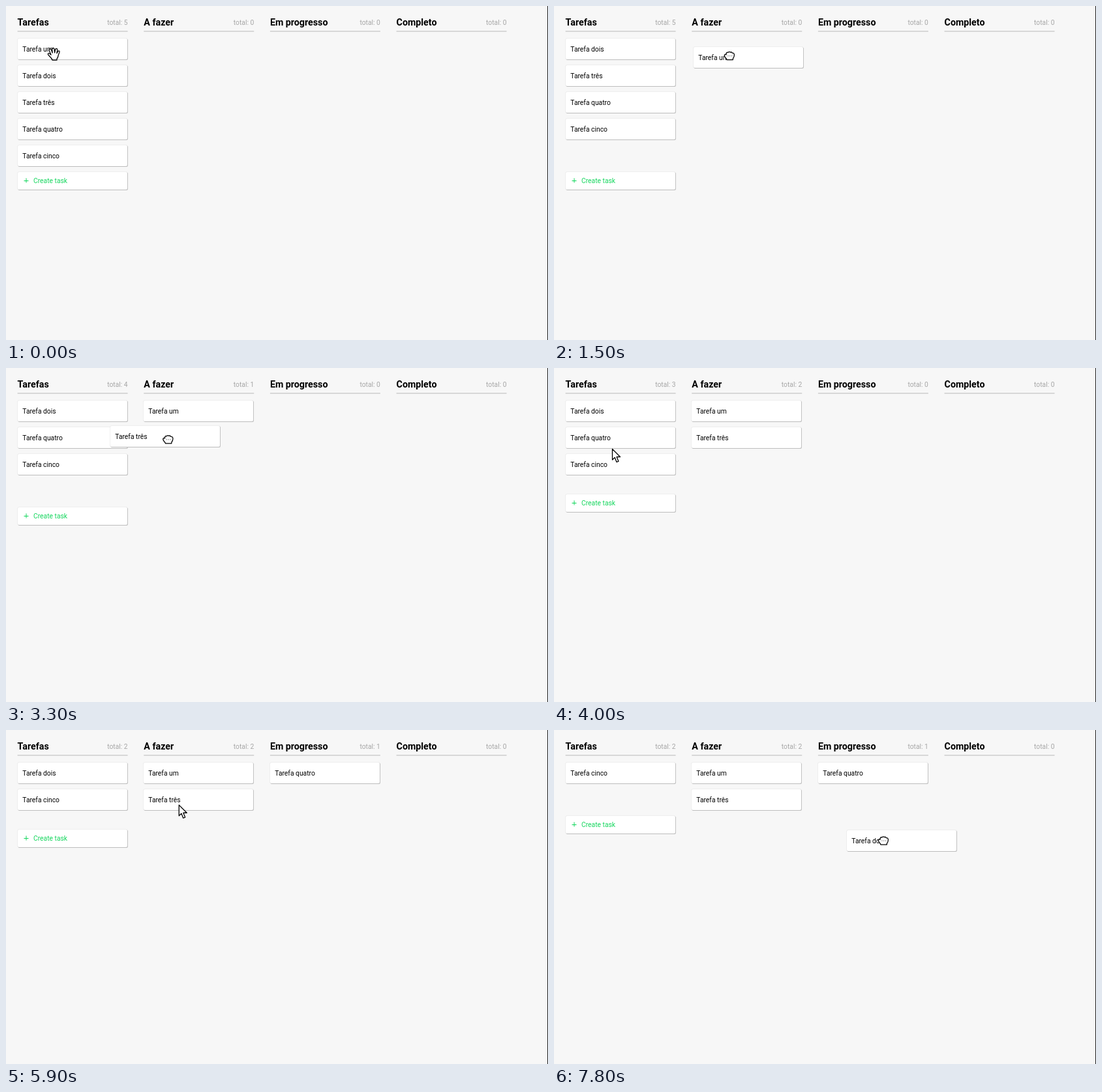
Animation, 831 px wide and 513 px high, one loop 8000 ms. Source, as an HTML page with a canvas:

```html
<!DOCTYPE html>
<html lang="pt">
<head>
<meta charset="utf-8">
<title>Quadro de tarefas</title>
<style>
  html, body { margin: 0; width: 100%; height: 100%; overflow: hidden; background: #f7f7f7; }
  canvas { display: block; }
</style>
</head>
<body>
<canvas id="board" width="831" height="513"></canvas>
<script>
const ctx = document.getElementById('board').getContext('2d');
const LOOP = 8000, STEP = 100;
const ROW = 41, TOP = 50, LIFT_GAP = 7.4, CARD_W = 168;
const TASKS = ['um', 'dois', 'três', 'quatro', 'cinco'];
const COLUMNS = ['Tarefas', 'A fazer', 'Em progresso', 'Completo'];

// Each drag: task index, target column, lift / slide / settle times, path of [time, x, y].
const DRAGS = [
  { task: 0, column: 1, lift: 200, slide: 500, settle: 2000,
    path: [[200, 24, 50], [600, 104, 54], [1000, 194, 58], [1500, 214, 63], [1700, 214, 63], [2000, 211, 50]] },
  { task: 2, column: 1, lift: 2700, slide: 3000, settle: 3900,
    path: [[2700, 27, 91], [3500, 204, 88], [3600, 204, 88], [3800, 211, 91]] },
  { task: 3, column: 2, lift: 4600, slide: 4700, settle: 5800,
    path: [[4600, 25, 91], [5100, 490, 56], [5200, 482, 60], [5300, 439, 58], [5400, 439, 58], [5700, 405, 50]] },
  { task: 1, column: 3, lift: 7400, slide: 7500, settle: Infinity,
    path: [[7400, 25, 51], [7800, 449, 154]] },
];

// Pointer centre; the shape holds until the next entry.
const POINTER = [
  [0, 73, 74, 'open'], [100, 73, 74, 'open'],
  [200, 79, 70, 'closed'], [600, 159, 69, 'closed'], [1000, 249, 72, 'closed'],
  [1500, 269, 76.5, 'closed'], [1600, 269, 76.5, 'closed'],
  [1700, 269, 77, 'open'], [1900, 210, 124, 'arrow'], [2100, 158, 119, 'open'],
  [2400, 107, 112, 'open'], [2600, 107, 112, 'open'],
  [2700, 115, 112, 'closed'], [3500, 293, 109, 'closed'], [3600, 293, 109, 'closed'],
  [3700, 270, 112, 'open'], [3800, 215, 122, 'arrow'], [4000, 95.5, 135, 'arrow'],
  [4100, 72, 125, 'open'], [4400, 61, 111, 'open'], [4500, 61, 111, 'open'],
  [4600, 68, 108, 'closed'], [5100, 533, 73, 'closed'], [5200, 525, 77, 'closed'],
  [5300, 482, 75, 'closed'], [5400, 482, 75, 'closed'],
  [5500, 480, 76, 'open'], [5600, 455, 95, 'arrow'], [6000, 210, 136, 'arrow'],
  [6200, 95, 112, 'open'], [6300, 65, 96, 'open'], [6600, 63, 69, 'open'],
  [7300, 63, 69, 'open'], [7400, 74, 68, 'closed'], [7800, 505, 170, 'closed'],
];

const SHAPES = {
  open: new Path2D(`M-4,1 L-6.5,-5 Q-7.3,-7.6 -5.6,-8 Q-4,-8.4 -3.2,-6 L-1.9,-2
    L-2.3,-7.5 Q-2.3,-9.4 -.7,-9.5 Q.9,-9.5 1.1,-7.5 L1.6,-2.2
    L2.6,-7 Q3,-8.8 4.6,-8.5 Q6,-8.2 5.7,-6.2 L4.9,-1.4
    L6.4,-4 Q7.2,-5.6 8.5,-5 Q9.6,-4.3 8.8,-2.5 Q7.2,1 6.8,3.5 Q6.4,5.5 5,7
    L5,9 L-2,9 Q-2.5,7 -5,4.5 L-8,1.2 Q-9.3,-.5 -8,-1.3 Q-6.6,-1.8 -4,1 Z`),
  closed: new Path2D(`M-5,-2.6 Q-4.6,-6 -2.2,-5 Q-.5,-7 1.2,-5.4 Q3.2,-6.4 4.3,-4.3
    Q7.5,-4.5 7.4,-1 Q7.3,2 5.5,4 L5.2,6.2 L-4,6.2 Q-4.4,4.5 -6.5,2.5
    Q-8.6,-.5 -7,-2 Q-6,-2.8 -5,-1.8 Z`),
  arrow: new Path2D('M-6,-10.5 L-6,6 L-2.3,2.5 L.5,9.5 L3.4,8.3 L.6,1.5 L6,1.5 Z'),
};

const clamp = v => Math.max(0, Math.min(1, v));
const mix = (a, b, k) => a + (b - a) * k;
const columnX = i => 17.6 + 193.65 * i;

function along(path, t) {
  const next = path.findIndex(p => p[0] > t);
  if (next < 0) return path[path.length - 1];
  const a = path[Math.max(0, next - 1)], b = path[next];
  const k = clamp((t - a[0]) / (b[0] - a[0]));
  return [t, mix(a[1], b[1], k), mix(a[2], b[2], k), a[3]];
}

// Vertical shift a drag gives to the cards below it.
function shift(drag, t) {
  if (t < drag.lift) return 0;
  const k = clamp((t - drag.slide) / 200);
  return mix(LIFT_GAP, -ROW, 1 - (1 - k) ** 2);
}

function text(label, x, y, color, font = '10.3px', align = 'left') {
  ctx.font = `${font} Roboto, sans-serif`;
  ctx.fillStyle = color;
  ctx.textAlign = align;
  ctx.fillText(label, x, y);
}

function panel(x, y, h) {
  const layer = (color, dx, dy, w, height) => {
    ctx.fillStyle = color;
    ctx.beginPath();
    ctx.roundRect(x + dx, y + dy, w, height, 2);
    ctx.fill();
  };
  layer('#e6e6e6', -.5, -.5, CARD_W + 1, h + 1);
  layer('#bdbdbd', .5, .5, CARD_W + .4, h + .5);
  layer('#fff', 0, 0, CARD_W, h);
}

function card(name, x, y) {
  x = Math.round(x);
  y = Math.round(y);
  panel(x, y, 32);
  text(`Tarefa ${name}`, x + 7.3, y + 20, '#000');
}

function drawHeaders(t) {
  const settled = DRAGS.filter(d => t >= d.settle);
  COLUMNS.forEach((title, i) => {
    const x = columnX(i);
    const total = i ? settled.filter(d => d.column === i).length : TASKS.length - settled.length;
    text(title, x, 30, '#000', 'bold 14.25px');
    text(`total: ${total}`, x + 169, 29, '#a6a6a6', '10.3px', 'right');
    ctx.fillStyle = '#c8c8c8';
    ctx.fillRect(x, 38.2, 169, 1.3);
  });
}

function drawCreate(t) {
  const y = Math.round(DRAGS.reduce((sum, d) => sum - ROW * clamp((t - d.settle) / 200), TOP + TASKS.length * ROW));
  panel(18, y, 27);
  ctx.fillStyle = '#13d65c';
  ctx.fillRect(27.5, y + 13, 7, 1);
  ctx.fillRect(30.5, y + 9.5, 1, 7);
  text('Create task', 42, y + 17, '#13d65c');
}

function drawCards(t) {
  const lifted = [];
  TASKS.forEach((name, i) => {
    const drag = DRAGS.find(d => d.task === i);
    if (drag && t >= drag.lift) {
      lifted.push([name, ...along(drag.path, t).slice(1, 3)]);
      return;
    }
    const y = DRAGS.reduce((sum, d) => d.task < i ? sum + shift(d, t) : sum, TOP + i * ROW);
    card(name, 18, y);
  });
  lifted.forEach(args => card(...args));
}

function drawPointer(t) {
  const [, x, y, shape] = along(POINTER, t);
  ctx.save();
  ctx.translate(x, y);
  ctx.lineWidth = 1.3;
  ctx.lineJoin = 'round';
  ctx.strokeStyle = '#000';
  ctx.fillStyle = '#fff';
  ctx.fill(SHAPES[shape]);
  ctx.stroke(SHAPES[shape]);
  if (shape === 'closed') {
    ctx.fillStyle = '#555';
    for (const dx of [-2.5, .3, 3.1]) ctx.fillRect(dx, -.5, 1, 1.2);
  }
  ctx.restore();
}

function draw(now) {
  const t = Math.floor(now % LOOP / STEP) * STEP;
  ctx.fillStyle = '#f7f7f7';
  ctx.fillRect(0, 0, 831, 513);
  drawHeaders(t);
  drawCreate(t);
  drawCards(t);
  drawPointer(t);
  ctx.fillStyle = '#222';
  ctx.fillRect(830, 0, 1, 513);
}

let start;
function tick(now) {
  start ??= now;
  draw(now - start);
  requestAnimationFrame(tick);
}
requestAnimationFrame(tick);
</script>
</body>
</html>
```
